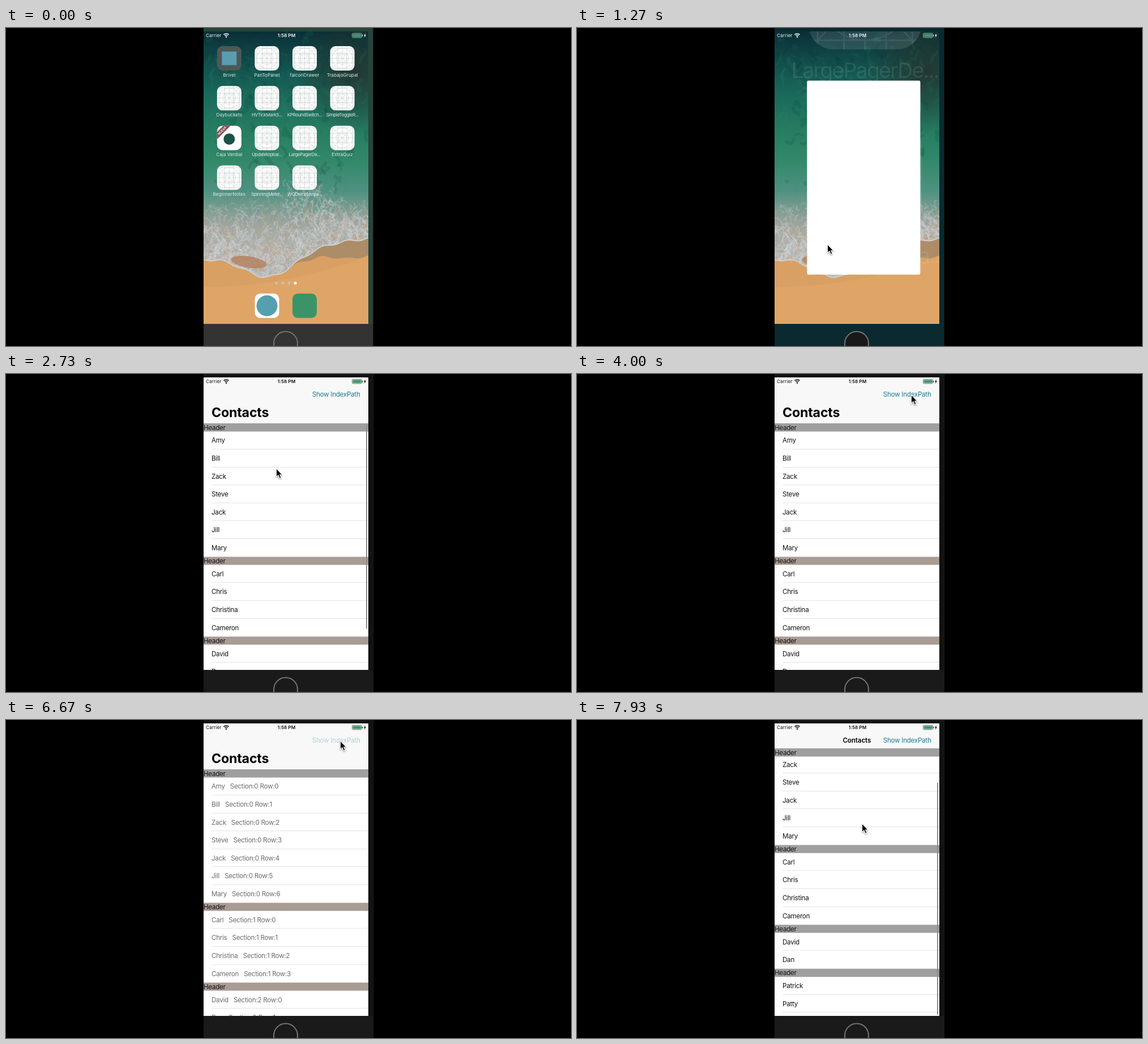
An HTML page with a canvas for the animation above (8 s loop, 998 by 561 pixels).

```html
<!DOCTYPE html>
<html lang="en">
<head>
<meta charset="utf-8">
<title>Contacts list demo</title>
<style>
html, body { margin: 0; width: 100%; height: 100%; overflow: hidden; background: #000; }
canvas { display: block; }
</style>
</head>
<body>
<canvas id="stage" width="998" height="561"></canvas>
<script>
const LOOP = 8000, STEP = 1000 / 15;
const SCREEN = { x: 349, y: 6, w: 291, h: 516 };
const BOTTOM = SCREEN.y + SCREEN.h;
const NAV_OPEN = 87, NAV_CLOSED = 50, HEADER_H = 14.4, ROW_H = 31.58, CONTENT_H = 525;
const SECTIONS = [
  ['Amy', 'Bill', 'Zack', 'Steve', 'Jack', 'Jill', 'Mary'],
  ['Carl', 'Chris', 'Christina', 'Cameron'],
  ['David', 'Dan'],
  ['Patrick', 'Patty'],
];
const APPS = [
  'Brivel', 'PanToPanel', 'falconDrawer', 'TrabajoGrupal',
  'Daybuckets', 'HVTickMarkS...', 'KPRoundSwitch...', 'SimpleToggleR...',
  'Caja Verdial', 'Updatetopbar...', 'LargePagerDe...', 'ExtraQuiz',
  'BeginnerNotes', 'SpinningMeter...', 'WQDemoListpa...',
];
const ICON = 43, ICON_RADIUS = 9.5, TAPPED = { x: 527, y: 264 };
const LAUNCH = 1133, SHOW = 4200, HIDE = 6530, DRAG = 7400, RELEASE = 7533;

const CURSOR_START = { x: 338, y: 352 };
const CURSOR_MOVES = [
  { from: 470, to: 900, x: 443, y: 383 },
  { from: 2130, to: 2730, x: 478, y: 168 },
  { from: 3200, to: 3670, x: 591, y: 38 },
  { from: 6730, to: 7330, x: 498, y: 224 },
  { from: DRAG, to: RELEASE, x: 500, y: 187 },
  { from: RELEASE, to: 7930, x: 504, y: 184 },
];
const ARROW = new Path2D('M0 0V12.6L3.1 9.8L5.8 15.6L7.4 14.9L4.8 9.3H8.8Z');
const BOLT = new Path2D('M634.8 9.5L631.8 13.6H633.6L633 17L636 12.4H634.2Z');

const ctx = document.getElementById('stage').getContext('2d');
const clamp = (v, lo = 0, hi = 1) => Math.min(hi, Math.max(lo, v));
const progress = (t, from, to) => clamp((t - from) / (to - from));
const mix = (a, b, p) => a + (b - a) * p;
const easeOut = p => 1 - (1 - p) ** 3;
const smooth = p => p * p * (3 - 2 * p);

function box(c, x, y, w, h, color, radius = 0) {
  c.fillStyle = color;
  c.beginPath();
  c.roundRect(x, y, w, h, radius);
  c.fill();
}

function disc(c, x, y, r, color) {
  c.fillStyle = color;
  c.beginPath();
  c.arc(x, y, r, 0, 7);
  c.fill();
}

// Places text so that its capitals are centred on y.
function text(str, x, y, { size = 11.6, weight = 400, color = '#111', align = 'left', spacing = -0.25 } = {}) {
  ctx.font = `${weight} ${size}px Inter, sans-serif`;
  ctx.letterSpacing = spacing + 'px';
  ctx.textAlign = align;
  ctx.fillStyle = color;
  ctx.fillText(str, x, y + size * 0.36);
}

function withAlpha(alpha, draw) {
  if (alpha <= 0) return;
  ctx.save();
  ctx.globalAlpha *= alpha;
  draw();
  ctx.restore();
}

function clipTo(x, y, w, h, radius, draw) {
  ctx.save();
  ctx.beginPath();
  ctx.roundRect(x, y, w, h, radius);
  ctx.clip();
  draw();
  ctx.restore();
}

// Wallpaper coordinates run from the top left corner of the screen.
function makeWallpaper() {
  const layer = document.createElement('canvas');
  const { w, h } = SCREEN;
  layer.width = w;
  layer.height = h;
  const c = layer.getContext('2d');
  let seed = 11;
  const rand = () => (seed = seed * 16807 % 2147483647) / 2147483647;
  const bump = (x, at, width) => Math.exp(-(((x / w - at) / width) ** 2));
  const shore = x => 402 - 36 * x / w + 46 * bump(x, 0.4, 0.22) + 2 * Math.sin(x / 7);
  const surf = x => 292 - 48 * bump(x, 0.62, 0.16) + 8 * Math.sin(x / 13);

  const verticalFill = colors => {
    const fill = c.createLinearGradient(0, 0, 0, 450);
    colors.forEach((color, i) => fill.addColorStop(i / (colors.length - 1), color));
    return fill;
  };
  const band = (top, bottom, color) => {
    c.fillStyle = color;
    for (let x = 0; x < w; x++) c.fillRect(x, top(x), 1, Math.max(0, bottom(x) - top(x)));
  };
  const squiggle = (x, y, length, width, color) => {
    c.strokeStyle = color;
    c.lineWidth = width;
    c.beginPath();
    c.moveTo(x, y);
    for (let i = 0; i < 3; i++) c.lineTo(x += (rand() - 0.5) * length, y += (rand() - 0.3) * length);
    c.stroke();
  };

  c.lineJoin = c.lineCap = 'round';
  box(c, 0, 0, w, h, verticalFill(['#0a2f38', '#124f4c', '#1a6a5b', '#257a60', '#318868', '#4e9181', '#9aa39b', '#b9b9b6', '#b9b9b6']));
  const shade = c.createRadialGradient(270, 70, 5, 270, 70, 110);
  shade.addColorStop(0, 'rgba(38,50,44,.8)');
  shade.addColorStop(1, 'rgba(38,50,44,0)');
  box(c, 0, 0, w, 200, shade);
  for (let i = 0; i < 220; i++)
    squiggle(rand() * w, rand() * 270, 16, 2 + rand() * 6, i % 2 ? 'rgba(8,50,50,.13)' : 'rgba(60,150,120,.1)');

  const foamTints = ['#bcc4c8', '#c3a183', '#c6ccd0', '#a3a9a8', '#cfd3d5'];
  for (let i = 0; i < 1500; i++) {
    const x = rand() * w, depth = Math.sqrt(rand());
    c.globalAlpha = 0.25 + 0.4 * depth;
    squiggle(x, mix(surf(x), shore(x) - 8, depth), 13, 0.6 + rand() * 2, foamTints[i % 5]);
  }
  c.globalAlpha = 0.75;
  c.fillStyle = '#b57b57';
  c.beginPath();
  c.ellipse(80, 407, 32, 10, 0.15, 0, 7);
  c.fill();
  c.globalAlpha = 1;

  band(shore, () => h, '#dfa566');
  band(shore, x => 451 - 55 * (x / w) ** 2, '#d9a064');
  band(shore, x => shore(x) + 30 * clamp(3 * x / w - 1.6), '#ad8c68');
  band(x => shore(x) - 2, shore, '#cfd0cf');
  return layer;
}
const wallpaper = makeWallpaper();

function tile(x, y, color) {
  box(ctx, x - ICON / 2, y - ICON / 2, ICON, ICON, color, ICON_RADIUS);
}

function clipToTile(x, y, draw) {
  clipTo(x - ICON / 2, y - ICON / 2, ICON, ICON, ICON_RADIUS, () => {
    ctx.translate(x, y);
    draw();
  });
}

function templateIcon(x, y) {
  tile(x, y, '#fff');
  clipToTile(x, y, () => {
    ctx.strokeStyle = '#c4c9c9';
    ctx.lineWidth = 0.6;
    ctx.beginPath();
    for (const d of [-18, -8, 0, 8, 18]) {
      ctx.moveTo(d, -22); ctx.lineTo(d, 22);
      ctx.moveTo(-22, d); ctx.lineTo(22, d);
    }
    for (const side of [-22, 22]) {
      ctx.moveTo(side, -22); ctx.lineTo(-side, 22);
    }
    for (const r of [7.5, 11, 18]) {
      ctx.moveTo(r, 0);
      ctx.arc(0, 0, r, 0, 7);
    }
    ctx.stroke();
  });
}

function pictureIcon(x, y) {
  tile(x, y, '#4c5956');
  box(ctx, x - 13, y - 12, 26, 24, '#5b9db0');
}

function bankIcon(x, y) {
  tile(x, y, '#fff');
  disc(ctx, x, y + 2, 10, '#1d5148');
  clipToTile(x, y, () => {
    ctx.translate(-11, -11);
    ctx.rotate(-Math.PI / 4);
    box(ctx, -22, -7, 44, 9, '#8a4a52');
    text('NUEVA', 0, -2.5, { size: 5.5, weight: 600, color: '#fff', align: 'center', spacing: 0 });
  });
}

function drawIcons() {
  const special = { 0: pictureIcon, 8: bankIcon };
  APPS.forEach((name, i) => {
    const x = 394.3 + (i % 4) * 66.6, y = 53.5 + Math.floor(i / 4) * 70.2;
    (special[i] || templateIcon)(x, y);
    text(name, x, y + 29.5, { size: 8, color: '#e0ebee', align: 'center', spacing: name.endsWith('...') ? -0.35 : 0.1 });
  });
  tile(461, 490, '#fff');
  disc(ctx, 461, 490, 18.5, '#559fae');
  tile(527.5, 490, '#3a9468');
}

function drawHome(zoom, win) {
  ctx.drawImage(wallpaper, SCREEN.x, SCREEN.y);
  withAlpha(1 - 1.4 * zoom, () => {
    const scale = win.w / ICON;
    ctx.translate(win.x + win.w / 2, win.y + win.h / 2);
    ctx.scale(scale, scale);
    ctx.translate(-TAPPED.x, -TAPPED.y);
    drawIcons();
    for (let i = 0; i < 4; i++) disc(ctx, 477.5 + i * 11.2, 450, 2.6, i === 3 ? '#fff' : '#bfc3bd');
  });
}

function drawStatusBar(color) {
  text('Carrier', 353, 13, { size: 8.2, color, spacing: 0.1 });
  text('1:58 PM', 495.5, 13, { size: 8.2, weight: 600, color, align: 'center', spacing: 0.05 });
  ctx.strokeStyle = color;
  ctx.lineWidth = 1.5;
  for (const r of [3.8, 6.6]) {
    ctx.beginPath();
    ctx.arc(389, 16.5, r, -Math.PI * 0.75, -Math.PI * 0.25);
    ctx.stroke();
  }
  disc(ctx, 389, 15.8, 1.3, color);
  ctx.lineWidth = 0.6;
  ctx.beginPath();
  ctx.roundRect(611.5, 9.3, 17, 7.6, 2);
  ctx.stroke();
  box(ctx, 612.6, 10.4, 14.8, 5.4, '#3d9a6a', 1);
  box(ctx, 629, 12, 1, 2.4, color);
  ctx.fillStyle = color;
  ctx.fill(BOLT);
}

function scrollAt(t) {
  const dragged = 32.5 * progress(t, DRAG, RELEASE);
  return dragged + 69.5 * easeOut(progress(t, RELEASE, 7950));
}

function drawRowText(name, section, row, y, t) {
  const indexed = `${name}   Section:${section} Row:${row}`;
  const hiding = t >= HIDE;
  const [before, after] = hiding ? [indexed, name] : [name, indexed];
  const start = hiding ? HIDE : SHOW;
  const slide = easeOut(progress(t, start + 70, start + 530));
  const offset = (1 - slide) * SCREEN.w;
  withAlpha(1 - slide, () => text(before, 363, y));
  withAlpha(slide, () => text(after, 363 + (hiding ? -offset : offset), y));
}

function drawList(t, scroll, navBottom) {
  let top = NAV_OPEN - scroll;
  const headers = [];
  SECTIONS.forEach((names, section) => {
    const height = HEADER_H + names.length * ROW_H;
    headers.push(clamp(navBottom, top, top + height - HEADER_H));
    names.forEach((name, row) => {
      const y = top + HEADER_H + row * ROW_H;
      drawRowText(name, section, row, y + ROW_H / 2, t);
      if (row < names.length - 1 || section === SECTIONS.length - 1)
        box(ctx, 363, Math.round(y + ROW_H) - 1, 277, 1, '#e4e4e4');
    });
    top += height;
  });
  headers.forEach((y, i) => {
    box(ctx, SCREEN.x, y, SCREEN.w, HEADER_H, scroll > 60 || i % 3 === 0 ? '#9f9f9f' : '#a99c95');
    text('Header', 349, y + 7.4);
  });
}

function drawScrollbar(t, scroll, navBottom) {
  const alpha = t < SHOW
    ? progress(t, 2000, 2200) * (1 - progress(t, 2740, 2930))
    : progress(t, DRAG, DRAG + 80);
  const view = BOTTOM - navBottom, ratio = view / CONTENT_H;
  const top = navBottom + 2 + (scroll - NAV_OPEN + navBottom) * ratio;
  const bottom = Math.min(top + view * ratio, BOTTOM - 2);
  withAlpha(alpha, () => box(ctx, 636, top, 2, bottom - top, '#8c8c8c', 1));
}

function linkAlpha(t) {
  const tap = t < HIDE ? SHOW : HIDE;
  return t < tap ? 1 : mix(0.3, 1, progress(t, tap + 130, tap + 530));
}

function drawApp(t) {
  const scroll = scrollAt(t);
  const navBottom = Math.max(NAV_CLOSED, NAV_OPEN - scroll);
  box(ctx, SCREEN.x, SCREEN.y, SCREEN.w, SCREEN.h, '#fff');
  drawList(t, scroll, navBottom);

  box(ctx, SCREEN.x, SCREEN.y, SCREEN.w, navBottom - SCREEN.y, '#f8f8f8');
  clipTo(SCREEN.x, NAV_CLOSED, SCREEN.w, navBottom - NAV_CLOSED, 0, () =>
    text('Contacts', 363, 68 - scroll, { size: 23.2, weight: 700, color: '#000', spacing: -0.2 }));
  withAlpha(progress(scroll, 31, 60), () =>
    text('Contacts', 494.3, 35.5, { weight: 600, color: '#000', align: 'center', spacing: -0.1 }));
  withAlpha(linkAlpha(t), () =>
    text('Show IndexPath', 625.5, 35.5, { color: '#1b7b91', align: 'right' }));
  drawScrollbar(t, scroll, navBottom);
}

function drawPhone(t) {
  const [body, edge, button] = t < 470 ? ['#333', '#26453b', '#333']
    : t < 1330 ? ['#0a2a30', '#0a2a30', '#191919']
    : ['#1a1a1a', '#121212', '#1a1a1a'];
  box(ctx, 349, 0, 300, 561, edge);
  box(ctx, 349, BOTTOM, 300, 39, body);
  box(ctx, 648, 0, 1, 561, '#1c1c1c');
  disc(ctx, 494, 556.5, 21, button);
  ctx.strokeStyle = '#757575';
  ctx.lineWidth = 2;
  ctx.stroke();
}

function drawCursor(t) {
  if (t < CURSOR_MOVES[0].from) return;
  let { x, y } = CURSOR_START;
  for (const move of CURSOR_MOVES) {
    const p = smooth(progress(t, move.from, move.to));
    x = mix(x, move.x, p);
    y = mix(y, move.y, p);
  }
  clipTo(349, 0, 300, 561, 0, () => {
    ctx.translate(x, y);
    ctx.shadowColor = 'rgba(0,0,0,.4)';
    ctx.shadowBlur = 3;
    ctx.shadowOffsetY = 1.5;
    ctx.strokeStyle = '#fff';
    ctx.lineWidth = 2;
    ctx.stroke(ARROW);
    ctx.shadowColor = 'transparent';
    ctx.fillStyle = '#000';
    ctx.fill(ARROW);
  });
}

function render(t) {
  ctx.fillStyle = '#000';
  ctx.fillRect(0, 0, 998, 561);
  drawPhone(t);

  const zoom = easeOut(progress(t, LAUNCH, LAUNCH + 470));
  const win = {
    x: mix(TAPPED.x - ICON / 2, SCREEN.x, zoom),
    y: mix(TAPPED.y - ICON / 2, SCREEN.y, zoom),
    w: mix(ICON, SCREEN.w, zoom),
    h: mix(ICON, SCREEN.h, zoom),
  };
  clipTo(SCREEN.x, SCREEN.y, SCREEN.w, SCREEN.h, 0, () => {
    if (zoom < 1) drawHome(zoom, win);
    withAlpha(clamp(zoom * 2), () => clipTo(win.x, win.y, win.w, win.h, ICON_RADIUS * (1 - zoom), () => {
      ctx.translate(win.x, win.y);
      ctx.scale(win.w / SCREEN.w, win.h / SCREEN.h);
      ctx.translate(-SCREEN.x, -SCREEN.y);
      drawApp(t);
      // The launch screen dissolves into the list.
      withAlpha(1 - progress(t, 1485, 1860), () =>
        box(ctx, SCREEN.x, SCREEN.y, SCREEN.w, SCREEN.h, '#fff'));
    }));
  });
  drawStatusBar(t < 1330 ? '#f2f5f5' : '#111');
  drawCursor(t);
}

function tick() {
  const t = performance.now() % LOOP;
  render(Math.floor((t + 4) / STEP) * STEP);
  requestAnimationFrame(tick);
}
tick();
</script>
</body>
</html>
```
